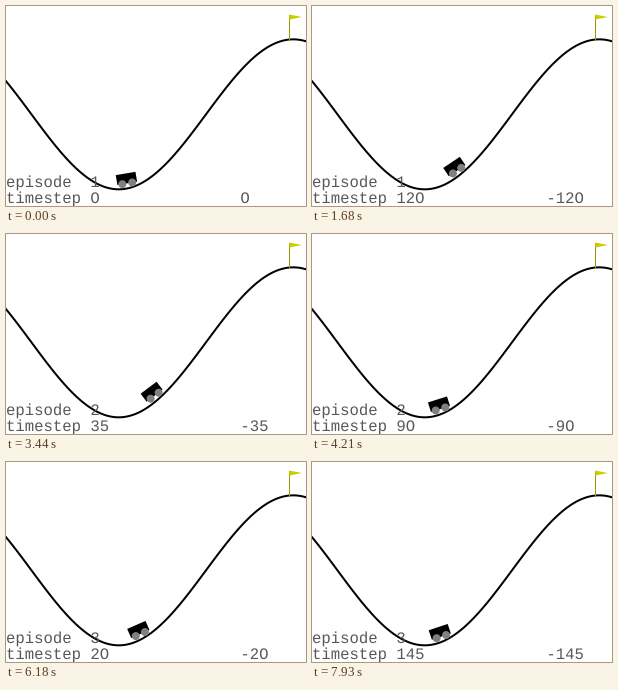
A matplotlib script for the animation above (8000 ms loop, 300 by 200 pixels).

```python
import matplotlib.pyplot as plt
import numpy as np
from matplotlib.animation import FuncAnimation
from matplotlib.patches import Circle, Polygon

WIDTH, HEIGHT = 300, 200
LOOP_MS, TICK_MS = 8000, 10
STEP_MS, STEPS_SHOWN, STRIDE = 70, 40, 5
EPISODE_MS = 2950                      # 40 views plus a pause on the last one
STARTS = (-0.4675, -0.4805, -0.4185)   # car position at each reset

X_MIN, X_MAX = -1.2, 0.6
SCALE = WIDTH / (X_MAX - X_MIN)
FORCE, GRAVITY = 0.001, 0.0025


def hill(x):
    """Pixel position of the track at world position x."""
    return np.array([(x - X_MIN) * SCALE, (0.45 * np.sin(3 * x) + 0.55) * SCALE])


def drive(x, steps):
    """Car positions while it always pushes to the right."""
    path, speed = [x], 0.0
    for _ in range(steps):
        speed += FORCE - GRAVITY * np.cos(3 * x)
        x += speed
        path.append(x)
    return path


paths = [drive(x, STEPS_SHOWN * STRIDE) for x in STARTS]

plt.rcParams["text.hinting"] = "none"
fig = plt.figure(figsize=(WIDTH / 72, HEIGHT / 72), dpi=72, facecolor="white")
ax = fig.add_axes([0, 0, 1, 1])
ax.set(xlim=(0, WIDTH), ylim=(0, HEIGHT))
ax.axis("off")

track_x, track_y = hill(np.linspace(X_MIN, X_MAX, 100))
ax.plot(track_x, track_y, color="black", lw=2, zorder=1)

BODY = np.array([(-10, 5), (-10, 15), (10, 15), (10, 5)])
HUBS = np.array([(5, 5), (-5, 5)])
body = ax.add_patch(Polygon(BODY, fc="black", lw=0, zorder=2))
wheels = [ax.add_patch(Circle(hub, 4, fc="#808080", lw=0, zorder=3)) for hub in HUBS]

flag_x, flag_y = hill(0.5)
top = flag_y + 25
ax.plot([flag_x, flag_x], [flag_y, top], color="#999900", lw=1, zorder=4)
ax.add_patch(Polygon([(flag_x, top), (flag_x, top - 5), (flag_x + 12.5, top - 2.5)],
                     fc="#cccc00", lw=0, zorder=5))


def label(y):
    return ax.text(0.3, y, "", family="Liberation Mono", size=15.65,
                   color="#585858", va="baseline", zorder=6)


episode_label, step_label = label(19), label(3)


def update(frame):
    ms = frame * TICK_MS
    episode, elapsed = divmod(ms, EPISODE_MS)
    step = min(elapsed // STEP_MS, STEPS_SHOWN - 1) * STRIDE
    x = paths[episode][step]

    angle = np.cos(3 * x)
    c, s = np.cos(angle), np.sin(angle)
    turn = np.array([(c, s), (-s, c)])
    body.set_xy(BODY @ turn + hill(x))
    for wheel, hub in zip(wheels, HUBS):
        wheel.center = hub @ turn + hill(x)

    episode_label.set_text(f"episode  {episode + 1}")
    # The letter O stands in for a zero without a dot.
    step_label.set_text(f"timestep {step:<16}{-step}".replace("0", "O"))
    return [body, *wheels, episode_label, step_label]


anim = FuncAnimation(fig, update, frames=LOOP_MS // TICK_MS, interval=TICK_MS,
                     repeat=True, repeat_delay=0)
plt.show()
```
